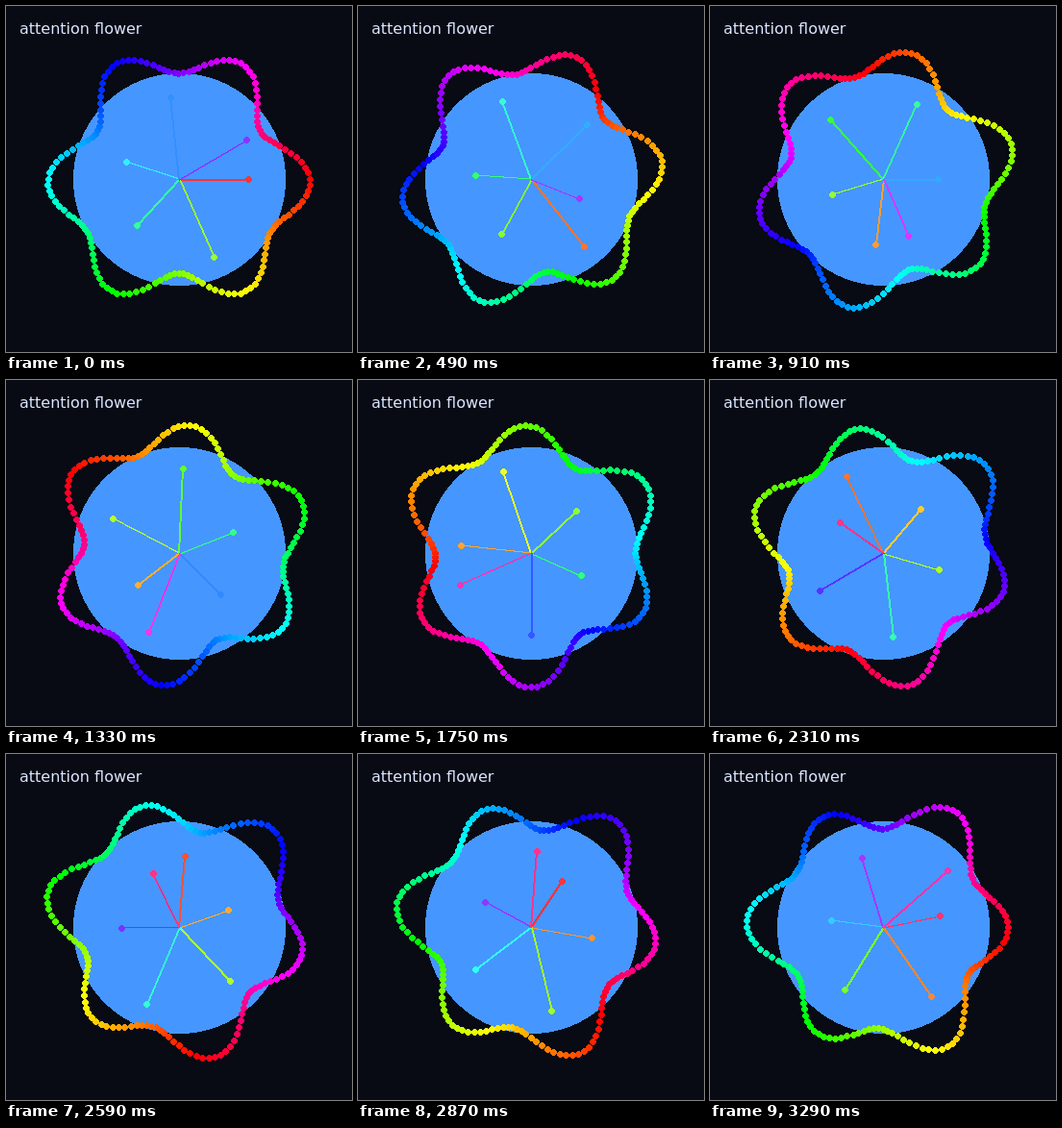
Write an HTML page with a canvas that moves like this. It is 360 by 360 pixels and loops after 3360 ms.

```html
<!DOCTYPE html>
<html lang="en">
<head>
<meta charset="utf-8">
<title>attention flower</title>
<style>
  html, body { margin: 0; width: 100%; height: 100%; overflow: hidden; background: #080a14; }
  #stage { position: relative; width: 360px; height: 360px; overflow: hidden; }
  canvas { display: block; }
  #title {
    position: absolute; left: 14px; top: 14px;
    font: 16px/19px "DejaVu Sans", sans-serif;
    color: #dce6ff; white-space: pre;
  }
</style>
</head>
<body>
<div id="stage">
  <canvas id="view" width="360" height="360"></canvas>
  <div id="title">attention flower</div>
</div>
<script>
const ctx = document.getElementById('view').getContext('2d');
const STEP = 70, STEPS = 48, TAU = Math.PI * 2;
const MID = 180, PETAL_DOTS = 140, SPOKES = 6;

const polar = (angle, r) => [
  Math.floor(MID + r * Math.cos(angle)),
  Math.floor(MID + r * Math.sin(angle)),
];

// Hard-edged disc, one pixel row at a time.
function disc(x, y, r, color) {
  ctx.fillStyle = color;
  for (let dy = -r; dy <= r; dy++) {
    const half = Math.floor(Math.sqrt((r + 0.5) ** 2 - dy * dy));
    ctx.fillRect(x - half, y + dy, 2 * half + 1, 1);
  }
}

// Hard-edged convex polygon with whole-pixel corners.
function polygon(points, color) {
  ctx.fillStyle = color;
  const ys = points.map(p => p[1]);
  for (let y = Math.min(...ys); y <= Math.max(...ys); y++) {
    const xs = [];
    points.forEach(([ax, ay], i) => {
      const [bx, by] = points[(i + 1) % points.length];
      if (ay === by) {
        if (y === ay) xs.push(ax, bx);
      } else if (y >= Math.min(ay, by) && y <= Math.max(ay, by)) {
        xs.push(ax + (bx - ax) * (y - ay) / (by - ay));
      }
    });
    const left = Math.round(Math.min(...xs));
    const right = Math.ceil(Math.max(...xs) - 0.5);
    if (right >= left) ctx.fillRect(left, y, right - left + 1, 1);
  }
}

function drawSpoke(i, t) {
  const a = i / SPOKES * TAU + 0.9 * t;
  const angle = 1.1 * a;
  const [x, y] = polar(angle, 72 + 18 * Math.sin(1.7 * a + 0.4 * t));
  const hue = i * 60 + 36 * Math.sin(i + 0.6 * t);
  const color = `hsl(${hue}, 100%, 60%)`;
  const dx = Math.round(Math.sin(angle)), dy = Math.round(Math.cos(angle));
  polygon([[MID, MID + dy], [x, y + dy], [x + dx, y], [MID + dx, MID]], color);
  disc(x, y, 3, color);
}

function drawPetals(t) {
  for (let i = 0; i < PETAL_DOTS; i++) {
    const a = i / PETAL_DOTS * TAU;
    const r = 120 + 16 * Math.cos(6 * a + t) + 6 * Math.sin(3 * a + 0.7 * t);
    const [x, y] = polar(a, r);
    disc(x, y, 3, `hsl(${(a + t) / TAU * 360}, 100%, 50%)`);
  }
}

function draw(n) {
  const t = n / STEPS * TAU;
  ctx.fillStyle = '#080a14';
  ctx.fillRect(0, 0, 360, 360);
  disc(MID, MID, 110, '#4696ff');
  for (let i = 0; i < SPOKES; i++) drawSpoke(i, t);
  drawPetals(t);
}

const start = performance.now();
let shown = 0;
function tick() {
  const n = Math.floor((performance.now() - start) / STEP) % STEPS;
  if (n !== shown) draw(shown = n);
  requestAnimationFrame(tick);
}
draw(0);
requestAnimationFrame(tick);
</script>
</body>
</html>
```
